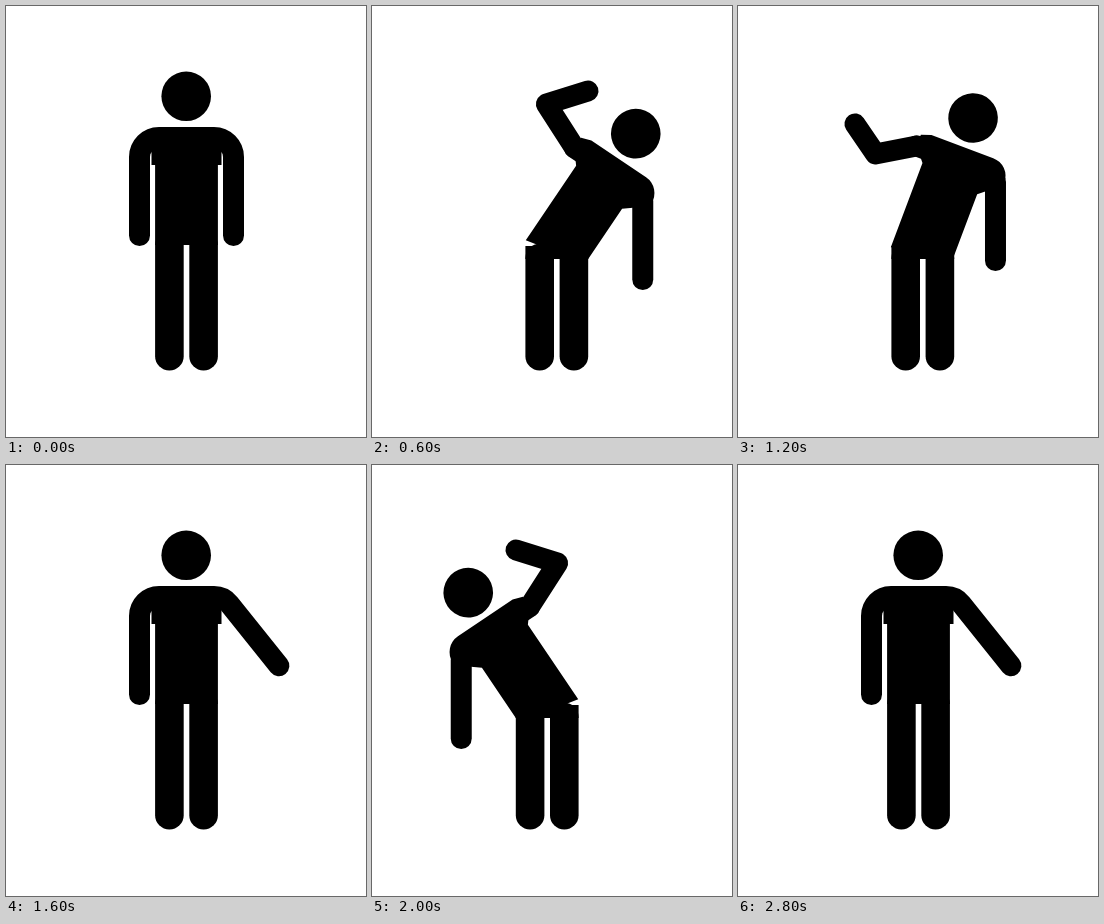
An HTML page with a canvas for the animation above (3000 ms loop, 360 by 431 pixels).

```html
<!DOCTYPE html>
<html lang="en">
<head>
<meta charset="utf-8">
<title>Side stretch</title>
<style>
  html, body { margin: 0; width: 100%; height: 100%; overflow: hidden; background: #fff; }
  canvas { display: block; width: 100%; height: 100%; }
</style>
</head>
<body>
<canvas id="stage" width="360" height="431"></canvas>
<script>
const STEP = 200;
const ctx = document.getElementById('stage').getContext('2d');
ctx.lineCap = ctx.lineJoin = 'round';

const fill = path => ctx.fill(new Path2D(path));

function limb(width, path) {
  ctx.lineWidth = width;
  ctx.stroke(new Path2D(path));
}

const arm = path => limb(21, path);

function head(x, y) {
  ctx.beginPath();
  ctx.arc(x, y, 24.8, 0, 2 * Math.PI);
  ctx.fill();
}

function legs(center, top) {
  for (const side of [-17.1, 17.1]) limb(28.6, `M${center + side} ${top}V350.2`);
}

// Draws in a nested frame: moved to a joint, then turned.
function at(x, y, angle, draw) {
  ctx.save();
  ctx.translate(x, y);
  ctx.rotate(angle);
  draw();
  ctx.restore();
}

function upright(reaching) {
  at(179.5, 0, 0, () => {
    const hanging = 'V151A19.5 19.5 0 0 1 -27.5 131.5H0';
    const raised = 'L-42.7 138.7A19.5 19.5 0 0 1 -27.5 131.5H0';
    head(0.3, 90.3);
    fill('M-35 124H35V159H31.4V239H-31.4V159H-35z');
    arm(reaching ? 'M-92.4 200.7' + raised : 'M-47 229.5' + hanging);
    ctx.scale(-1, 1);
    arm('M-47 229.5' + hanging);
    ctx.scale(-1, 1);
    legs(0, 239);
  });
}

// The upper body turns about the hip; the free arm keeps hanging straight down.
function lean(degrees, elbow, hand) {
  const tilt = degrees * Math.PI / 180;
  legs(184.8, 252);
  fill('M153.4 240H216.2V253H153.4z');
  at(183, 242, tilt, () => {
    head(3, -140);
    fill('M-28.5 10V-80L-40 -94V-106L-30 -109.5H36a19 19 0 0 1 19 19L42 -77 33.7 -70V-4z');
    arm('M-20 -94H-40');
    at(-40, -94, -tilt, () => arm(`M0 0L${elbow}L${hand}`));
    at(46.5, -88, -tilt, () => arm('M0 0V78.5'));
  });
}

const reach = () => upright(true);
const slight = () => lean(20.6, [-41.2, 8], [-61.7, -22]);
const bend = () => lean(34, [-28, -43.7], [13.6, -56.7]);
const deep = () => lean(39.7, [-21, -48], [20.7, -60.4]);

// One stretch to the right, then the same stretch mirrored.
const stretch = [reach, slight, bend, deep, bend, slight, reach];
const cycle = 1 + 2 * stretch.length;

function draw(now) {
  const step = Math.floor(now / STEP) % cycle;
  const mirrored = step === 0 || step > stretch.length;
  ctx.clearRect(0, 0, 360, 431);
  ctx.save();
  if (mirrored) ctx.transform(-1, 0, 0, 1, 360, 0);
  if (step === 0) upright(false);
  else stretch[(step - 1) % stretch.length]();
  ctx.restore();
}

const start = performance.now();
function tick() {
  draw(performance.now() - start);
  requestAnimationFrame(tick);
}
tick();
</script>
</body>
</html>
```
